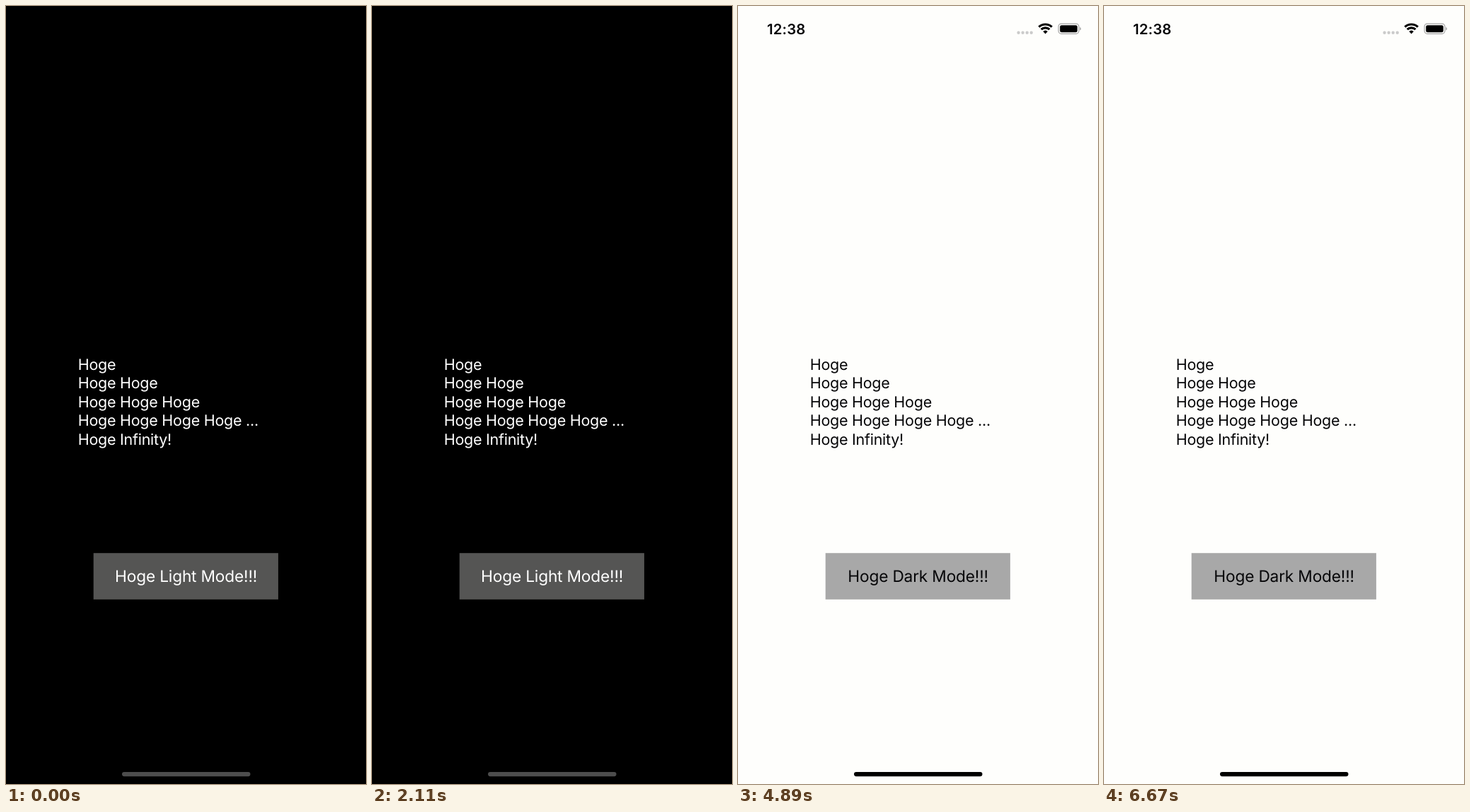
These frames come from a looping animation (509x1101 px, 7450 ms). An HTML page:

```html
<!DOCTYPE html>
<html lang="en">
<head>
<meta charset="utf-8">
<title>Light and dark mode</title>
<style>
  html, body { margin: 0; width: 100%; height: 100%; overflow: hidden; background: #000; }
  svg { display: block; width: 100%; height: 100%; }
  text { font-family: Inter, sans-serif; font-optical-sizing: none; fill: currentColor; white-space: pre; text-rendering: geometricPrecision; }
  .dark { color: #fff; --page: #000; --button: #555554; --home: #4d4d4d; }
  .light { color: #060608; --page: #fefefc; --button: #a8a8a8; --home: #000; animation: toggle 7.45s step-end infinite; }
  .page { fill: var(--page); }
  .button { fill: var(--button); }
  .home { fill: var(--home); }
  .body { font-size: 21.5px; letter-spacing: -.26px; }
  .label { font-size: 22.7px; letter-spacing: -.18px; text-anchor: middle; }
  .clock { font-size: 20.3px; font-weight: 600; letter-spacing: .15px; text-anchor: middle; }
  /* switches at 560, 2110, 3000, 4000, 4890, 5890 and 6670 ms */
  @keyframes toggle {
    0%, 28.3221%, 53.6913%, 79.0604% { visibility: hidden; }
    7.5168%, 40.2685%, 65.6376%, 89.5302% { visibility: visible; }
    100% { visibility: hidden; }
  }
</style>
</head>
<body>
<svg viewBox="0 0 509 1101">
  <defs>
    <g id="screen">
      <rect class="page" width="509" height="1101"/>
      <g class="body">
        <text x="101.7" y="514.8">Hoge</text>
        <text x="101.7" y="541.2">Hoge Hoge</text>
        <text x="101.7" y="567.7">Hoge Hoge Hoge</text>
        <text x="101.7" y="594.1">Hoge Hoge Hoge Hoge ...</text>
        <text x="101.7" y="620.5">Hoge Infinity!</text>
      </g>
      <rect class="button" x="123.7" y="774.2" width="261.2" height="65.6"/>
      <rect class="home" x="164" y="1084" width="181.5" height="6.2" rx="3.1"/>
    </g>
  </defs>

  <g class="dark">
    <use href="#screen"/>
    <text class="label" x="254.6" y="815.4">Hoge Light Mode!!!</text>
  </g>

  <g class="light">
    <use href="#screen"/>
    <text class="label" x="254.6" y="815.4">Hoge Dark Mode!!!</text>
    <text class="clock" x="68.2" y="39.8">12:38</text>
    <!-- signal -->
    <path d="M396.6 37.7h18.2" stroke="#cbcbcb" stroke-width="4.4" stroke-linecap="round" stroke-dasharray="0 6.05"/>
    <!-- wifi -->
    <g transform="translate(434.6 39.5)" fill="none" stroke="#000" stroke-width="3.2">
      <path d="M-9.2 -9.9A13.5 13.5 0 0 1 9.2 -9.9M-5.9 -6.3A8.6 8.6 0 0 1 5.9 -6.3"/>
      <path d="M0 0L-3.3 -3.5A4.8 4.8 0 0 1 3.3 -3.5Z" fill="#000" stroke="none"/>
    </g>
    <!-- battery -->
    <rect x="453.1" y="25.1" width="28.8" height="14.2" rx="4" fill="none" stroke="#a3a3a3" stroke-width="1.2"/>
    <rect x="455.2" y="27.2" width="24.6" height="10" rx="2.3"/>
    <path d="M483.4 29.8a2.6 2.6 0 0 1 0 4.8z" fill="#a3a3a3"/>
  </g>
</svg>
</body>
</html>
```
